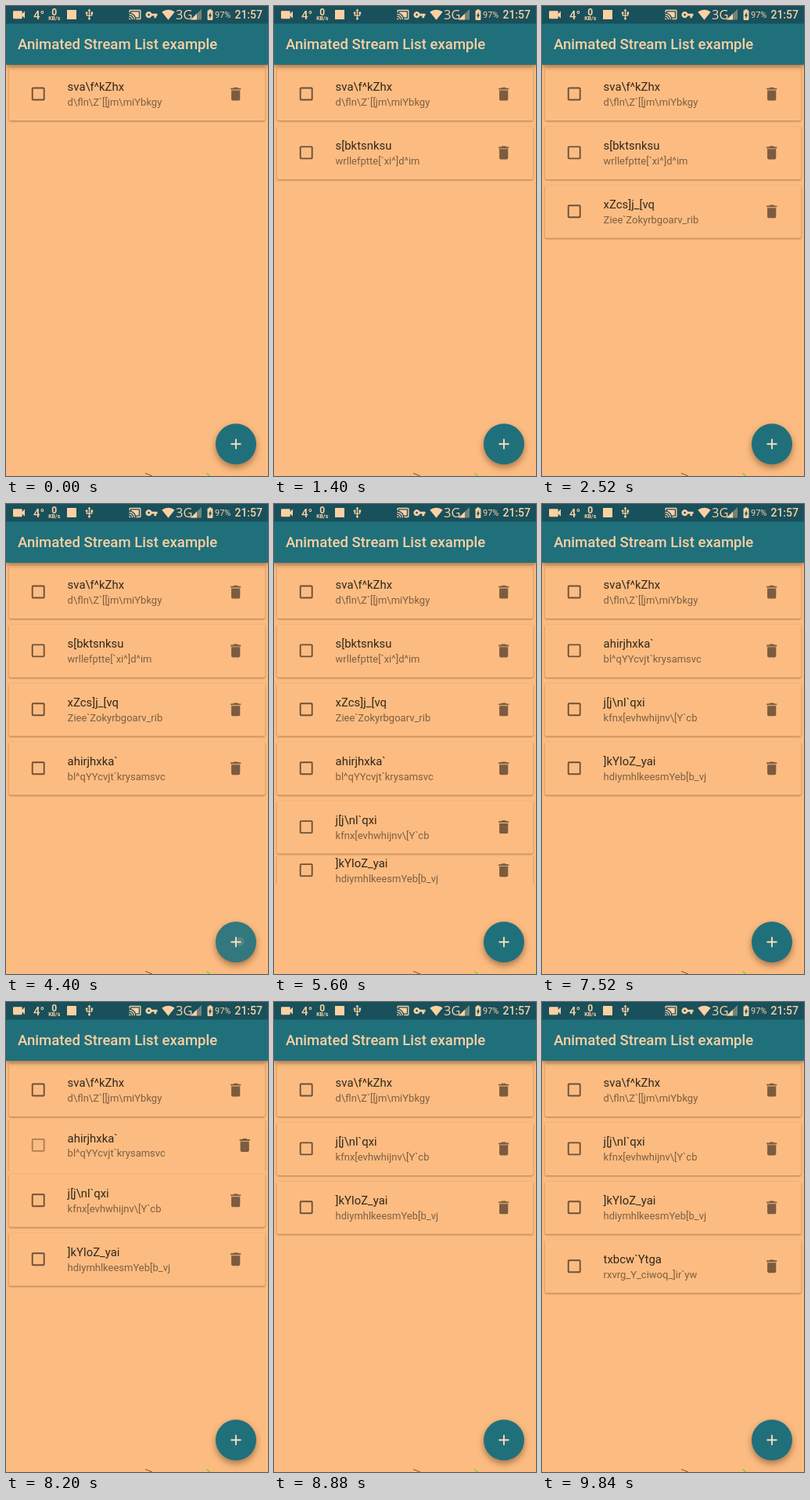
Animation of 335 by 599 pixels, one loop 9.92 s. Source, as an HTML page:

```html
<!DOCTYPE html>
<html lang="en">
<head>
<meta charset="utf-8">
<title>Animated Stream List example</title>
<style>
  html, body { margin: 0; width: 100%; height: 100%; overflow: hidden; background: #fcbc81; }
  #stage { display: block; width: 100vw; height: 100vh; }
  text { font-family: Roboto, sans-serif; white-space: pre; }
  .light { fill: #fdd0a2; }
  .card { fill: #fcbc81; filter: drop-shadow(0 1px 1px rgba(60, 25, 0, .42)); }
  .bar { filter: drop-shadow(0 2px 3px rgba(50, 20, 0, .5)); }
  .fab { filter: drop-shadow(0 4px 4px rgba(50, 20, 0, .42)); }
  .head { font-size: 14.9px; fill: #33271d; }
  .sub { font-size: 13px; fill: #7e5e43; }
</style>
</head>
<body>
<svg id="stage" viewBox="0 0 335 599" preserveAspectRatio="none">
  <rect width="335" height="599" fill="#fcbc81"/>
  <g id="list"></g>

  <g class="bar">
    <rect width="335" height="74.9" fill="#20707b"/>
  </g>
  <rect width="335" height="22.5" fill="#18505c"/>
  <text class="light" x="15" y="54.8" font-size="18.6" font-weight="500">Animated Stream List example</text>

  <g id="status" class="light">
    <text x="35" y="16.5" font-size="15" font-weight="500">4°</text>
    <text x="61.7" y="11.5" font-size="12" font-weight="700" text-anchor="middle">0</text>
    <text x="61.7" y="18.3" font-size="7" font-weight="700" text-anchor="middle">KB/s</text>
    <rect x="78" y="5" width="12" height="12"/>
    <text x="217" y="17" font-size="16.5" style="font-family:'Open Sans',sans-serif" textLength="">3G</text>
    <path d="M236 17.5H250V4Z" opacity=".4"/>
    <path d="M236 17.5H244V9.8Z"/>
    <text x="267" y="15" font-size="11">97%</text>
    <text x="328" y="16" font-size="14" font-weight="500" text-anchor="end">21:57</text>
  </g>

  <circle class="fab" cx="294" cy="558.3" r="26" fill="#20707b"/>
  <clipPath id="fabClip"><circle cx="294" cy="558.3" r="26"/></clipPath>
  <g clip-path="url(#fabClip)" fill="#fdd0a2">
    <circle id="glow" cx="294" cy="558.3" r="26"/>
    <circle id="ripple" cx="299" cy="557.5"/>
  </g>
  <path d="M287.5 558.3H300.5M294 551.8V564.8" stroke="#fbdcbc" stroke-width="1.9"/>
  <path d="M178 595.5L187 599" stroke="#8a4a25"/>
  <path d="M256.5 595.5L260.5 599" stroke="#5fe01c" stroke-width="1.3"/>
</svg>

<script>
const LOOP = 9920, ROW = 74.9, GROW = 300;
const NS = 'http://www.w3.org/2000/svg';
const $ = id => document.getElementById(id);

const icons = {
  trash: 'M6 19c0 1.1.9 2 2 2h8c1.1 0 2-.9 2-2V7H6v12zM19 4h-3.5l-1-1h-5l-1 1H5v2h14V4z',
  video: 'M17 10.5V7c0-.55-.45-1-1-1H4c-.55 0-1 .45-1 1v10c0 .55.45 1 1 1h12c.55 0 1-.45 1-1v-3.5l4 4v-11l-4 4z',
  usb: 'M15 7v4h1v2h-3V5h2l-3-4-3 4h2v8H8v-2.1a2.2 2.2 0 1 0-2 0V13a2 2 0 0 0 2 2h3v3.1a2.2 2.2 0 1 0 2 0V15h3a2 2 0 0 0 2-2v-2h1V7z',
  cast: 'M21 3H3a2 2 0 0 0-2 2v3h2V5h18v14h-7v2h7a2 2 0 0 0 2-2V5a2 2 0 0 0-2-2zM1 18v3h3a3 3 0 0 0-3-3zm0-4v2a5 5 0 0 1 5 5h2a7 7 0 0 0-7-7zm18-7H5v1.6a13 13 0 0 1 8.4 8.4H19zM1 10v2a9 9 0 0 1 9 9h2A11 11 0 0 0 1 10z',
  key: 'M12.65 10a6 6 0 1 0 0 4H17v4h4v-4h2v-4zM7 14a2 2 0 1 1 0-4 2 2 0 0 1 0 4z',
  wifi: 'M12 21.5L23.64 7A19 19 0 0 0 .36 7z',
  battery: 'M15.7 4H14V2h-4v2H8.3A1.3 1.3 0 0 0 7 5.3v15.4A1.3 1.3 0 0 0 8.3 22h7.4a1.3 1.3 0 0 0 1.3-1.3V5.3A1.3 1.3 0 0 0 15.7 4zM11 20v-5.5H9L13 7v5.5h2z'
};

// title, subtitle, time added, time removed
const items = [
  ['sva\\f^kZhx', 'd\\fln\\Z`[[jm\\miYbkgy', -GROW, Infinity],
  ['s[bktsnksu', 'wrllefptte[`xi^]d^im', 1000, 6300],
  ['xZcs]j_[vq', 'Ziee`Zokyrbgoarv_rib', 2000, 7200],
  ['ahirjhxka`', 'bl^qYYcvjt`krysamsvc', 3250, 8165],
  ['j[j\\nl`qxi', 'kfnx[evhwhijnv\\[Y`cb', 4450, Infinity],
  [']kYloZ_yai', 'hdiymhlkeesmYeb[b_vj', 5460, Infinity],
  ['txbcw`Ytga', 'rxvrg_Y_ciwoq_]ir`yw', 9100, Infinity]
];

const clamp = v => Math.max(0, Math.min(1, v));

function add(parent, tag, attrs, text) {
  const el = document.createElementNS(NS, tag);
  for (const k in attrs) el.setAttribute(k, attrs[k]);
  if (text) el.textContent = text;
  return parent.appendChild(el);
}

function icon(parent, name, cx, cy, size, attrs) {
  const s = size / 24;
  return add(parent, 'path', {
    d: icons[name],
    transform: `translate(${cx - size / 2} ${cy - size / 2}) scale(${s})`,
    ...attrs
  });
}

const status = $('status');
icon(status, 'video', 16.5, 11.2, 20);
icon(status, 'usb', 106.5, 10.8, 16);
icon(status, 'cast', 165, 11, 16.5);
icon(status, 'key', 186, 11.2, 16.5);
icon(status, 'wifi', 207.5, 11, 17);
icon(status, 'battery', 261, 11, 16.5);

const rows = items.map(([head, sub, born, gone]) => {
  const clip = add($('list'), 'svg', { x: 0, width: 335, overflow: 'hidden' });
  const body = add(clip, 'g', {});
  add(body, 'rect', { class: 'card', x: 3.7, y: 3.7, width: 327.6, height: 67.4, rx: 2.5 });
  const box = add(body, 'rect', {
    x: 33.7, y: 29.6, width: 15, height: 15, rx: .8, fill: 'none', 'stroke-width': 1.9
  });
  add(body, 'text', { class: 'head', x: 78.6, y: 33.5 }, head);
  add(body, 'text', { class: 'sub', x: 78.6, y: 52.2 }, sub);
  const bin = add(body, 'g', {});
  icon(bin, 'trash', 293.7, 37.2, 22.4, { fill: '#7c5b40' });
  return { clip, body, box, bin, born, gone };
});

function render(t) {
  let y = ROW;
  for (const r of rows) {
    const removing = t >= r.gone;
    const f = removing ? 1 - clamp((t - r.gone) / GROW) : clamp((t - r.born) / GROW);
    const h = ROW * f;
    r.clip.setAttribute('display', f > 0 ? 'inline' : 'none');
    r.clip.setAttribute('y', y);
    r.clip.setAttribute('height', h);
    r.body.setAttribute('transform', `translate(0 ${(h - ROW) / 2})`);
    r.box.setAttribute('stroke', removing ? '#ac7f56' : '#6f5138');
    r.bin.setAttribute('transform', `translate(${removing ? 11.5 : 0} 0)`);
    y += h;
  }

  // the button is touched shortly before each new row
  let glow = 0, radius = 0;
  for (const r of rows) {
    const p = t - r.born + 110;
    if (r.born > 0 && p > 0 && p < 240) {
      glow = clamp(p / 60) * clamp((240 - p) / 110);
      radius = 4 + 26 * (p / 240) ** 2;
    }
  }
  $('glow').setAttribute('opacity', .08 * glow);
  $('ripple').setAttribute('opacity', .16 * glow);
  $('ripple').setAttribute('r', radius);
}

const start = performance.now();
function tick() {
  render((performance.now() - start) % LOOP);
  requestAnimationFrame(tick);
}
render(0);
requestAnimationFrame(tick);
</script>
</body>
</html>
```
